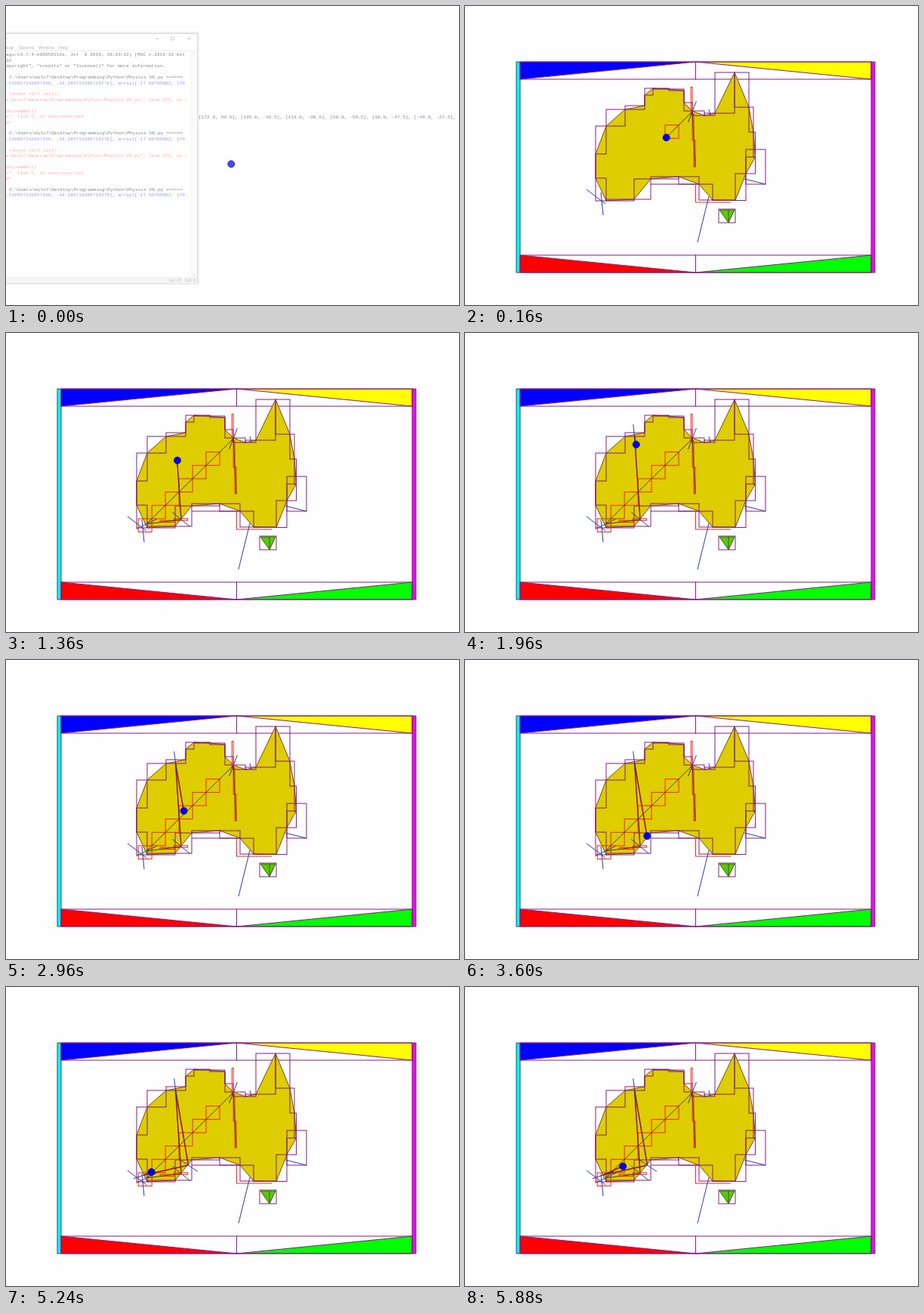
An HTML page with a canvas that plays this animation: 600x396 px, repeating every 5.92 s.

```html
<!DOCTYPE html>
<html lang="en">
<head>
<meta charset="utf-8">
<title>Bouncing ball</title>
<style>
html, body { margin: 0; width: 100%; height: 100%; overflow: hidden; background: #fefdff; }
canvas, svg { position: absolute; left: 0; top: 0; }
.code { font: 6.18px "Liberation Mono", monospace; white-space: pre; }
.menu { font: 5.6px "Open Sans", sans-serif; fill: #aaa; }
.ink { fill: #858585; }
.out { fill: #9898f4; }
.err { fill: #ffaaa6; }
</style>
</head>
<body>
<canvas id="stage" width="600" height="396"></canvas>
<svg id="shell" width="600" height="396" viewBox="0 0 600 396">
  <g fill="none" stroke="#eeedef">
    <path d="M0 35.5H254.500V367.500H0" stroke="#f1f0f2" stroke-width="3"/>
    <path d="M0 36.500H253.500V367H0" stroke="#d9d8da" fill="#fffeff"/>
    <path d="M0 59.500H253M0 359.500H253M246.500 60V359"/>
  </g>
  <path d="M0 360H253V367H0Z" fill="#f6f5f7"/>
  <path d="M198 43.500H202M218.500 41H223V45H218.500ZM240.500 41L244.500 45M244.500 41L240.500 45M248 63L249.500 61.500L251 63M248 355L249.500 356.500L251 355M0 43H2"
    fill="none" stroke="#bbb" stroke-width=".7"/>
  <g class="menu">
    <text x="0" y="57">bug</text><text x="17" y="57">Options</text>
    <text x="43" y="57">Window</text><text x="70" y="57">Help</text>
    <text x="217" y="365">Ln: 21</text><text x="237" y="365">Col: 0</text>
  </g>
</svg>
<script>
const LOOP = 5920, TICK = 40;
const ctx = document.getElementById("stage").getContext("2d");
const shell = document.getElementById("shell");

// Shell window text
function addText(x, y, kind, text) {
  const el = document.createElementNS("http://www.w3.org/2000/svg", "text");
  el.setAttribute("x", x);
  el.setAttribute("y", y);
  el.setAttribute("class", "code " + kind);
  el.textContent = text;
  shell.append(el);
}
function addRow(n, kind, text, x = 0) {
  addText(x, 66.3 + n * 7.44, kind, text);
}
const path = "milo7\\Desktop\\Programming\\Python\\Physics V6.py";
addRow(0, "ink", "ags/v3.7.4:e09359112e, Jul  8 2019, 19:29:22) [MSC v.1916 32 bit");
addRow(1, "ink", "32");
addRow(2, "ink", 'opyright", "credits" or "license()" for more information.');
for (const top of [4, 14, 24]) {
  addRow(top, "ink", "C:\\Users\\" + path + " ======", 4.6);
  addRow(top + 1, "out", ".142857142857146, -14.285714285714278], array([-17.66705882, 179.");
  if (top === 24) break;
  addRow(top + 3, "err", "recent call last):", 4.6);
  addRow(top + 4, "err", "s\\" + path + '", line 275, in <');
  addRow(top + 6, "err", "ob(newBall)");
  addRow(top + 7, "err", 'r", line 5, in onscreenclick');
  addRow(top + 8, "err", "or");
}
addText(255, 149, "ink", "[172.0, 50.5], [145.0, -19.5], [114.0, -96.5], [50.0, -59.5], [10.0, -47.5], [-49.0, -27.5],");

const PURPLE = "#802080", RED = "#f02818", BLUE = "#2a3c9c", DARK = "#301830";
const arena = { left: 68, right: 543, top: 74, bottom: 353, mid: 305.5, bar: 5, rise: 23 };

// Corners of the land, clockwise from its peak
const land = [
  [357, 88], [376, 134], [382, 167], [384.5, 200], [372, 222], [358, 257.5],
  [328, 257], [310, 236], [283, 226], [246, 229], [224, 256], [187, 258],
  [173, 228], [173, 196], [187, 159], [212, 137], [238, 132], [238, 118],
  [249, 109], [270, 110], [290, 112], [290, 128], [301, 139], [317, 145], [331, 142]
];

// Time and place of the start and of each bounce; speed is constant in between
const hits = [
  [0, 305, 213], [83, 301, 140], [339, 186, 253], [440, 232, 247],
  [1740, 224.5, 136], [3660, 241.5, 236], [4880, 183, 249], [6500, 225, 230]
].map(([time, x, y]) => ({ time, x, y }));

const legs = hits.slice(1).map((end, i) => {
  const start = hits[i], span = end.time - start.time;
  const vx = (end.x - start.x) / span, vy = (end.y - start.y) / span;
  return { start, span, vx, vy, speed: Math.hypot(vx, vy), steps: Math.ceil(span / TICK) };
});

function along(leg, time) {
  return [leg.start.x + leg.vx * time, leg.start.y + leg.vy * time];
}

function line(color, a, b, width = 1) {
  ctx.strokeStyle = color;
  ctx.lineWidth = width;
  ctx.beginPath();
  ctx.moveTo(...a);
  ctx.lineTo(...b);
  ctx.stroke();
}
function shape(fill, stroke, points) {
  ctx.fillStyle = fill;
  ctx.strokeStyle = stroke;
  ctx.lineWidth = 1;
  ctx.beginPath();
  points.forEach(p => ctx.lineTo(...p));
  ctx.closePath();
  ctx.fill();
  ctx.stroke();
}
function box(color, [x1, y1], [x2, y2]) {
  ctx.strokeStyle = color;
  ctx.lineWidth = 1;
  ctx.strokeRect(x1, y1, x2 - x1, y2 - y1);
}

function drawArena() {
  const { left, right, top, bottom, mid, bar, rise } = arena;
  const sides = [
    { outer: left, inner: left + bar, color: "#00ffff", wedges: ["#0000ff", "#ff0000"] },
    { outer: right, inner: right - bar, color: "#ff00ff", wedges: ["#ffff00", "#00ff00"] }
  ];
  for (const { outer, inner, color, wedges } of sides) {
    shape(color, "#404060", [[outer, top], [inner, top], [inner, bottom], [outer, bottom]]);
    [[top, top + rise], [bottom, bottom - rise]].forEach(([edge, tip], i) => {
      shape(wedges[i], PURPLE, [[inner, edge], [mid, edge], [inner, tip]]);
      box(PURPLE, [inner, edge], [mid, tip]);
    });
  }
}

function drawLand() {
  shape("#decd00", "#804020", land);
  land.forEach((p, i) => box(PURPLE, p, land[(i + 1) % land.length]));
  box(PURPLE, [372, 190], [398, 236]);
  line(PURPLE, [246, 236], [310, 236]);
  line(RED, [305.5, 236], [305.5, 260]);
  line(RED, [305, 260], [352, 260]);
  line(BLUE, [370, 229], [398, 236]);
  line(BLUE, [323, 252], [308, 313]);
  line(BLUE, [323, 137], [325, 145]);
  line(BLUE, [161, 243], [186, 262]);
  line(BLUE, [180, 247], [183, 277]);
}

function drawMarker() {
  shape("#58cc00", "#405020", [[337, 270], [357, 270], [349, 287]]);
  box("#703060", [336, 269], [358, 287]);
  line("#405020", [349, 270], [349, 287]);
}

// One red box per step, starting clear of the wall
function drawSteps(leg, age, first) {
  const count = Math.min(leg.steps, Math.ceil(age / TICK));
  for (let i = first; i < count; i++)
    box(RED, along(leg, i * TICK), along(leg, (i + 1) * TICK));
}

// The wall normal halves the angle between the paths in and out
function drawNormal(before, after) {
  const nx = after.vx / after.speed - before.vx / before.speed;
  const ny = after.vy / after.speed - before.vy / before.speed;
  const k = 15 / Math.hypot(nx, ny), { x, y } = after.start;
  line(BLUE, [x - nx * k, y - ny * k], [x + nx * k, y + ny * k]);
}

function drawTrail(t) {
  legs.forEach((leg, i) => {
    const age = t - leg.start.time;
    if (age < 0) return;
    drawSteps(leg, age, i ? 1 : 0);
    line(DARK, [leg.start.x, leg.start.y], along(leg, Math.min(age, leg.span)), .8);
    if (i) drawNormal(legs[i - 1], leg);
  });
}

function drawBall([x, y], fill, rim) {
  ctx.beginPath();
  ctx.arc(x + .3, y + .3, 4.5, 0, Math.PI * 2);
  ctx.fillStyle = fill;
  ctx.strokeStyle = rim;
  ctx.lineWidth = 1;
  ctx.fill();
  ctx.stroke();
}

function draw(now) {
  const t = Math.floor((now % LOOP) / TICK) * TICK;
  const opening = t < TICK;
  ctx.clearRect(0, 0, 600, 396);
  shell.style.opacity = opening ? 1 : t < 2 * TICK ? .4 : 0;
  if (opening) return drawBall([298, 209], "#4646f4", "#3535b8");
  drawArena();
  drawLand();
  drawMarker();
  drawTrail(t);
  const leg = legs.find(l => t < l.start.time + l.span);
  drawBall(along(leg, t - leg.start.time), "#0000ff", "#101090");
}

const begin = performance.now();
function loop() {
  draw(performance.now() - begin);
  requestAnimationFrame(loop);
}
loop();
</script>
</body>
</html>
```
